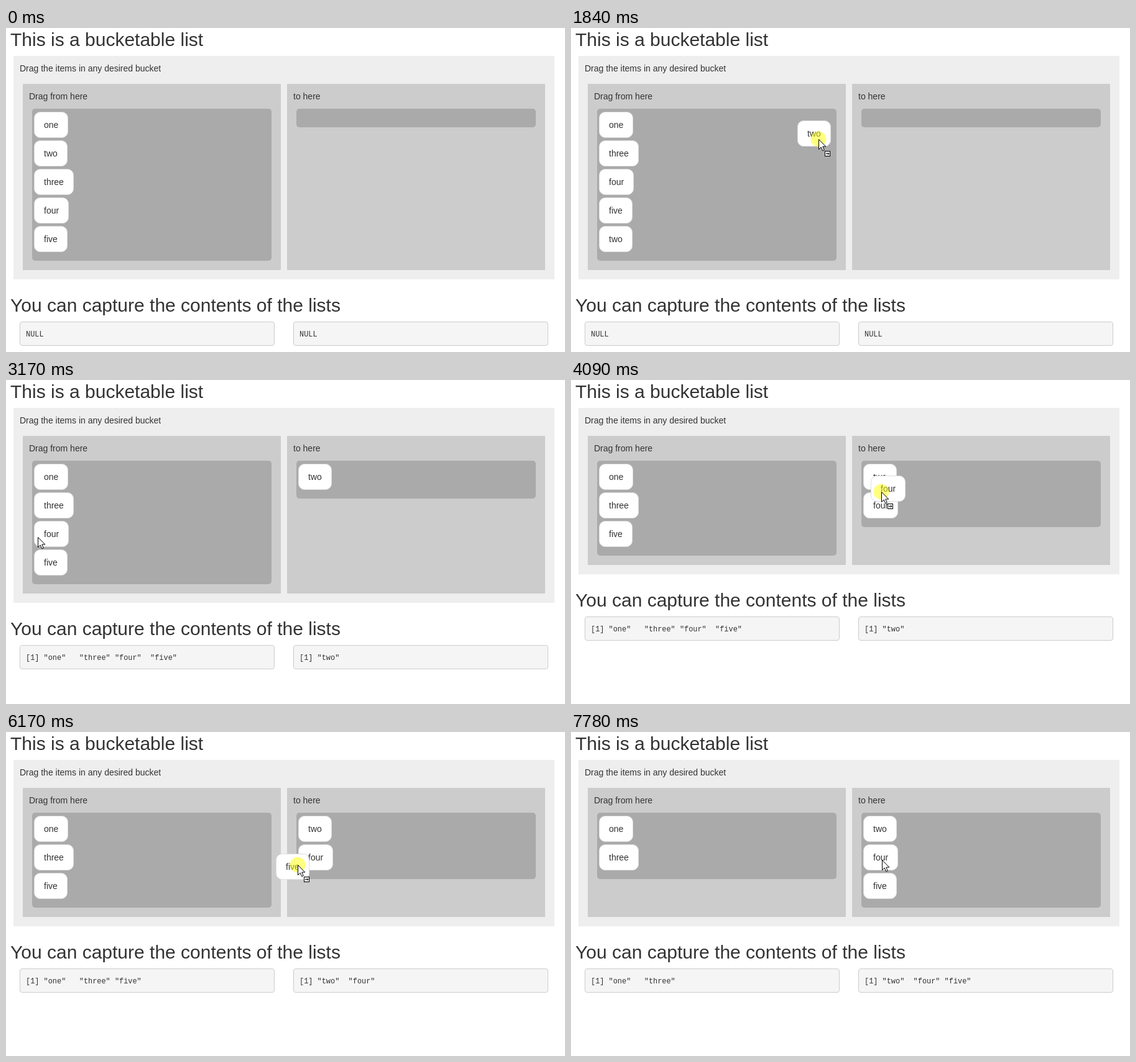
Animation, 899 px wide and 522 px high, one loop 8000 ms. Source, as an HTML page:

```html
<!DOCTYPE html>
<html>
<head>
<meta charset="utf-8">
<style>
html, body { margin: 0; width: 100%; height: 100%; overflow: hidden; background: #fff; }
svg { display: block; font: 14px "Liberation Sans", Arial, sans-serif; fill: #333; }
.title { font-size: 30px; }
.code { font: 11.91px "Liberation Mono", monospace; white-space: pre; }
</style>
</head>
<body>
<svg id="stage" width="899" height="522"></svg>
<script>
const LOOP = 8000, TICK = 77;
const WIDTHS = { one: 55, two: 54, three: 64, four: 56, five: 54 };
const ITEMS = Object.keys(WIDTHS);
const DRAGGED = ['two', 'four', 'five'];
const PRINT_TIMES = [2480, 4560, 6630];

// Each pointer move eases from where the previous one ended.
const ENTRY = [748, 490];
const MOVES = [
  { start: 130, end: 360, to: [142, 133] },
  { start: 530, end: 680, to: [93, 156] },
  { start: 910, end: 1140, to: [79, 211], beam: true },
  { start: 1370, end: 2063, to: [509, 168], drag: 'two' },
  { start: 2250, end: 2250, to: [509, 164] },
  { start: 2480, end: 3170, to: [51, 253] },
  { start: 3250, end: 3400, to: [62, 253] },
  { start: 3400, end: 4090, to: [499, 180], drag: 'four' },
  { start: 4260, end: 4330, to: [572, 143] },
  { start: 4560, end: 5320, to: [84, 243] },
  { start: 5400, end: 5400, to: [80, 245], beam: true },
  { start: 5630, end: 6254, to: [490, 212], drag: 'five' },
  { start: 6480, end: 6480, to: [502, 212] },
  { start: 7010, end: 7250, to: [503, 167] },
  { start: 7630, end: 7780, to: [500, 206] }
];
MOVES.forEach((move, i) => move.from = i ? MOVES[i - 1].to : ENTRY);

const ease = u => u * u * (3 - 2 * u);

// The two buckets once the first n drags are done.
function buckets(n) {
  const right = DRAGGED.slice(0, n);
  return [ITEMS.filter(item => !right.includes(item)), right];
}

const rect = (x, y, w, h, fill, r = 0, more = '') =>
  `<rect x="${x}" y="${y}" width="${w}" height="${h}" rx="${r}" fill="${fill}" ${more}/>`;
const text = (x, y, s, cls = '') => `<text x="${x}" y="${y}" class="${cls}">${s}</text>`;
const outlined = (x, y, w, h, fill, stroke, r) =>
  rect(x + .5, y + .5, w - 1, h - 1, fill, r, `stroke="${stroke}"`);
const itemBox = (x, y, item) =>
  outlined(x, y, WIDTHS[item], 42, '#fff', '#ddd', 9.5) + text(x + 16, y + 26, item);
const listHeight = list => list.length ? 15 + 46 * list.length : 30;

function bucket(x, label, list, height) {
  return rect(x, 90, 415, height + 55, '#ccc') + text(x + 10, 115, label) +
    rect(x + 15, 130, 385, listHeight(list), '#aaa', 5) +
    list.map((item, i) => itemBox(x + 18, 135 + 46 * i, item)).join('');
}

function printed(list) {
  const width = Math.max(...list.map(s => s.length)) + 2;
  return '[1] ' + list.map(s => `"${s}"`.padEnd(width)).join(' ').trimEnd();
}

function pointer(x, y, beam, dragging) {
  if (beam) {
    const shape = `M${x} ${y - 7.5}h2.5l1 1 1-1h2.5m-3.5 1v13M${x} ${y + 7.5}h2.5l1-1 1 1h2.5`;
    return `<path d="${shape}" fill="none" stroke="#000"/>`;
  }
  const arrow = `<path d="M${x + .5} ${y + .5}v16l3.7-3.5 2.5 5.7 2.6-1.1-2.5-5.6h5z" fill="#fff" stroke="#000"/>`;
  const badge = outlined(x + 10, y + 19, 9, 9, '#fff', '#000', 0) +
    `<path d="M${x + 12} ${y + 23.5}h5m-2.2-2.2 2.2 2.2-2.2 2.2" fill="none" stroke="#000"/>`;
  return arrow + (dragging ? badge : '');
}

function scene(t) {
  const move = MOVES.filter(m => m.start <= t).pop();
  const done = MOVES.filter(m => m.drag && m.start <= t && m !== move).length;
  const [left, right] = buckets(done);
  let over = '';

  if (move) {
    const { start, end, from, to, drag } = move;
    const elapsed = TICK * Math.floor((t - start) / TICK + .2);
    const u = end > start ? Math.min(1, elapsed / (end - start)) : 1;
    const [x, y] = from.map((a, i) => Math.round(a + (to[i] - a) * ease(u)));
    const dragging = drag && u > 0;
    if (dragging) {
      const home = left.indexOf(drag);
      over += itemBox(45 + x - from[0], 135 + 46 * home + y - from[1], drag);
      if (x > 110) {
        left.splice(home, 1);
        (x > 470 ? right : left).push(drag);
      }
    }
    if (drag) over += `<circle cx="${x}" cy="${y}" r="12.5" fill="#ff0" fill-opacity=".5"/>`;
    over += pointer(x, y, move.beam && u === 1, dragging);
  }

  const height = Math.max(listHeight(left), listHeight(right));
  const bottom = 160 + height;
  const prints = PRINT_TIMES.filter(p => p <= t).length;
  const output = prints ? buckets(prints).map(printed) : ['NULL', 'NULL'];

  return text(7, 29, 'This is a bucketable list', 'title') +
    rect(12, 45, 870, height + 115, '#eee') +
    text(22, 70, 'Drag the items in any desired bucket') +
    bucket(27, 'Drag from here', left, height) +
    bucket(452, 'to here', right, height) +
    text(7, bottom + 52, 'You can capture the contents of the lists', 'title') +
    output.map((s, i) => outlined(22 + 440 * i, bottom + 68, 410, 39, '#f5f5f5', '#ccc', 3.5) +
      text(32 + 440 * i, bottom + 92, s, 'code')).join('') +
    over;
}

const stage = document.getElementById('stage');
let shown = '';
function frame() {
  const next = scene(performance.now() % LOOP);
  if (next !== shown) stage.innerHTML = shown = next;
  requestAnimationFrame(frame);
}
frame();
</script>
</body>
</html>
```
